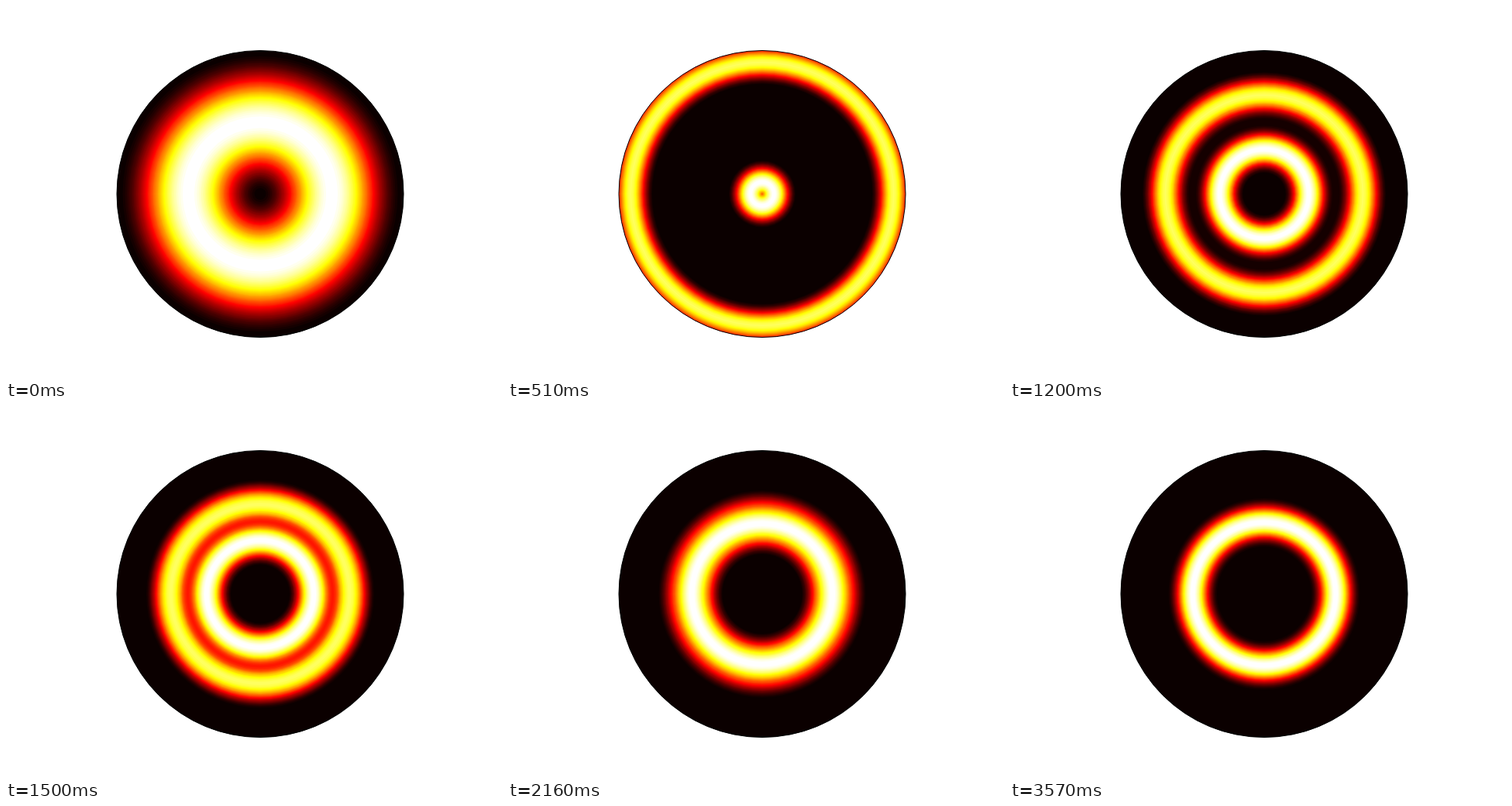
These frames come from a looping animation (640x480 px, 3600 ms). An HTML page with a canvas:

```html
<!DOCTYPE html>
<html lang="en">
<head>
<meta charset="utf-8">
<title>Converging rings</title>
<style>
  html, body { margin: 0; width: 100%; height: 100%; overflow: hidden; background: #fff; }
  canvas { display: block; }
</style>
</head>
<body>
<canvas id="stage" width="640" height="480"></canvas>
<script>
const ctx = document.getElementById("stage").getContext("2d");
const LOOP = 3600, STEP = 30, LEVELS = 64;
const CX = 328, CY = 242.5, R = 185, MID = R / 2;

// Black-red-yellow-white colour ramp
const ramp = Array.from({ length: LEVELS }, (_, i) => {
  const channel = (from, span) =>
    Math.round(255 * Math.min(1, Math.max(0, (i + 1 - from) / span)));
  return `rgb(${channel(0, 24)},${channel(24, 24)},${channel(48, 16)})`;
});

function bump(distance, width) {
  const x = Math.abs(distance) / width;
  return x < 1 ? Math.cos(x * Math.PI / 2) ** 2 : 0;
}

// Radial brightness at step n: a wide ring splits, then its halves converge
function profile(n) {
  const decay = 0.0355;
  const offset = 145 * (Math.exp(-decay * n) - Math.exp(-0.25 * n));
  const width = 33 * Math.sqrt(1 - 0.6 * Math.exp(-2 * decay * n))
    + 71.6 * Math.exp(-0.3 * n);
  const bridge = 0.15 * Math.exp(-(((n - 51) / 8) ** 2));
  return r => {
    const d = r - MID;
    return bump(d + offset, width) + 0.83 * bump(d - offset, width)
      + bridge * bump(d, width);
  };
}

function disc(radius) {
  ctx.beginPath();
  ctx.arc(CX, CY, radius, 0, 2 * Math.PI);
}

function draw(n) {
  const value = profile(n);
  const samples = Array.from({ length: 2 * R }, (_, i) => value(i / 2 + 0.25));
  const peak = Math.max(...samples);
  ctx.fillStyle = "#fff";
  ctx.fillRect(0, 0, 640, 480);

  let last = -1;
  for (let i = samples.length - 1; i >= 0; i--) {
    const level = Math.min(LEVELS - 1, Math.floor(samples[i] / peak * LEVELS));
    if (level === last) continue;
    last = level;
    disc((i + 1) / 2);
    ctx.fillStyle = ramp[level];
    ctx.fill();
  }
  disc(R);
  ctx.lineWidth = 1;
  ctx.strokeStyle = "#000";
  ctx.stroke();
}

let shown = -1;
const start = performance.now();
function tick() {
  const n = Math.floor((performance.now() - start) % LOOP / STEP);
  if (n !== shown) draw(shown = n);
  requestAnimationFrame(tick);
}
tick();
</script>
</body>
</html>
```
